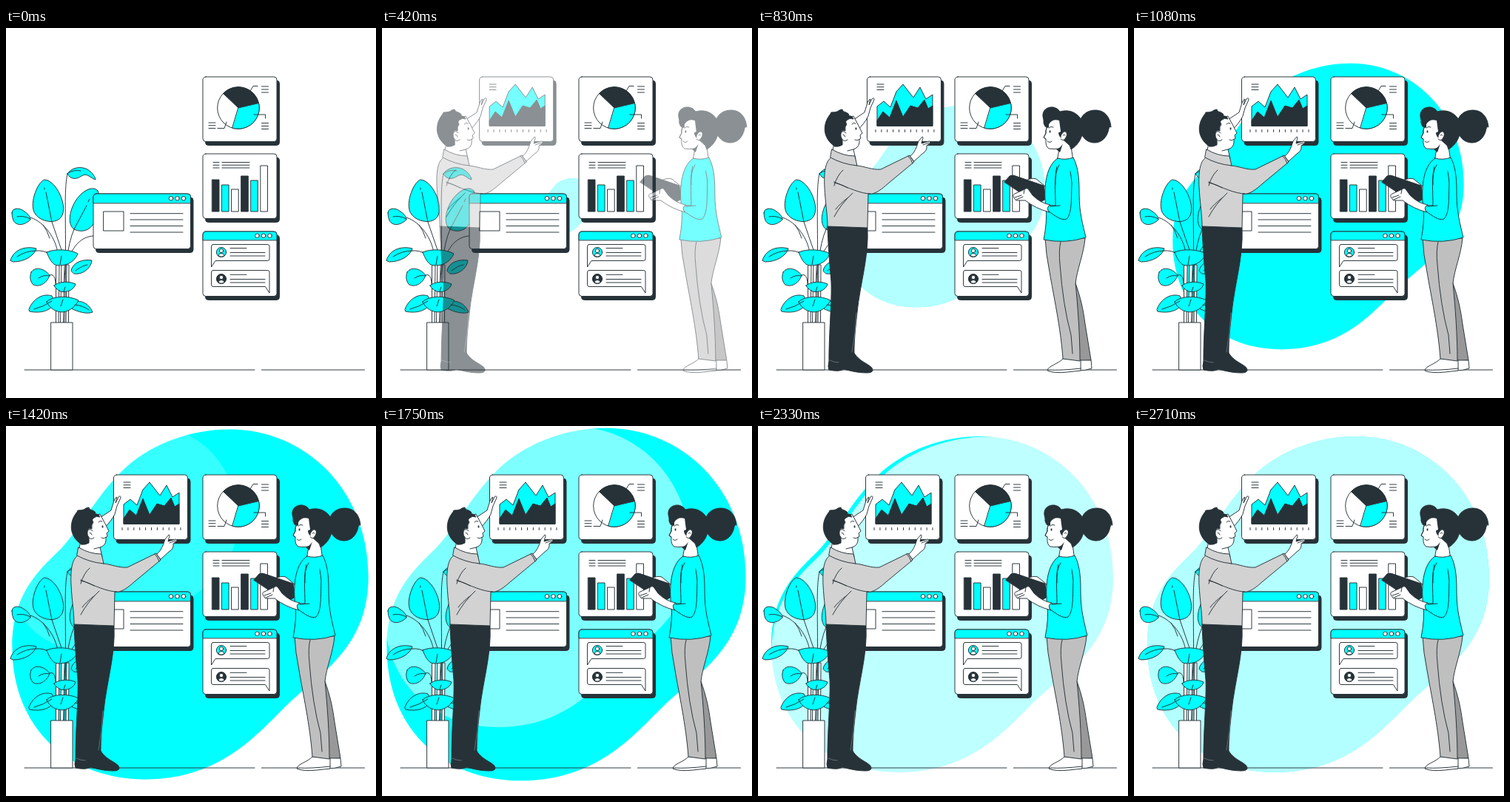
Write an HTML page that moves like this. It is 500 px wide and 500 px high and loops after 2750 ms.

```html
<!DOCTYPE html>
<html lang="en">
<head>
<meta charset="utf-8">
<title>Data presentation</title>
<style>
html, body { margin: 0; width: 100%; height: 100%; overflow: hidden; background: #fff; }
svg { display: block; width: 100vw; height: 100vh; }
.ln { fill: none; }
.w { fill: #fff; }
.c { fill: #0ff; }
.d { fill: #263238; }
.s { fill: #d2d2d2; }
.g { fill: #bfbfbf; }
.g2 { fill: #989898; }
.n { stroke: none; }
</style>
</head>
<body>
<svg viewBox="0 0 500 500" stroke="#263238" stroke-width=".95" stroke-linecap="round" stroke-linejoin="round">
  <defs>
    <path id="blob" d="M300 14C398 14 480 92 480 205C480 286 432 322 387 360C346 395 300 468 190 468C95 468 18 405 18 296C18 225 55 195 82 168C112 135 130 95 168 61C202 32 250 14 300 14Z"/>
  </defs>
  <g id="back" class="n">
    <use href="#blob" fill="#0ff"/>
    <use id="veil" href="#blob" fill="#fff"/>
  </g>

  <path class="ln" d="M25 462H336M345.500 462H484.500"/>

  <g id="plant">
    <path class="ln" d="M83 197C77 225 83 270 79 398M62 262L76 303M33 256C52 262 68 285 70 305M50 266Q56 274 59 284M92 272Q79 300 75 398M118 281C101 282 90 296 86 310M41 301C55 300 62 307 66 315M59 334C66 331 67 341 67 348"/>
    <path class="w" d="M67.500 398V322Q70 318 72 322L71 398M73.500 398L75 320H79L77.500 398M81 398L82 320H85L84.500 398"/>
    <path class="c" d="M50 206C42 210 30 240 40 252C48 263 73 267 77 250C81 234 66 205 52 205Z"/>
    <path class="c" d="M124 220C118 213 105 218 95 232C85 247 83 266 92 272C105 278 118 272 122 255C126 240 127 226 124 220Z"/>
    <path class="c" d="M83 197C88 189 100 186 110 191C117 195 121 202 121 205C114 203 110 195 102 200C95 205 87 205 83 197Z"/>
    <path class="c" d="M8 250C8 243 18 242 25 248C31 252 33 256 33 259C25 267 14 268 10 260Q8 256 8 250Z"/>
    <path class="c" d="M6 314C10 300 25 294 41 298C38 308 25 316 10 316Z"/>
    <path class="c" d="M88 328C90 316 105 312 116 314C115 325 103 334 92 332Z"/>
    <path class="c" d="M34 330C38 323 50 323 59 334C56 344 46 351 37 347C32 342 32 335 34 330Z"/>
    <path class="c" d="M31 380C36 366 50 358 62 362L66 370C62 383 45 386 32 383Z"/>
    <path class="c" d="M90 371C100 366 112 372 117 384C110 387 98 384 88 379Z"/>
    <path class="c" d="M55 303C65 298 88 299 97 305C92 318 78 323 66 320C60 316 57 308 55 303Z"/>
    <path class="c" d="M65 348C72 342 86 342 94 346C92 354 82 358 74 356Q67 353 65 348Z"/>
    <path class="c" d="M55 370C62 362 85 361 98 368C92 380 80 386 70 383C62 381 57 375 55 370Z"/>
    <path class="ln" d="M52 216V218M54 222L62 262M113 231L111 235M109 240L92 272M84 196Q92 191 101 193M15 255Q24 253 33 258M15 309Q27 301 41 301M94 328Q103 321 110 320M44 338Q51 333 59 335M38 380Q50 377 62 369M93 374Q104 375 112 381M73 320L75 308M78 356L80 350M74 376L77 367"/>
    <rect class="w" x="61" y="398" width="29" height="64"/>
  </g>

  <g id="cards"></g>

  <g id="man">
    <path class="d" d="M92 268L146 270C148 310 136 345 132 385C129 412 128 425 128 439C136 453 154 455 153 463Q152 466 145 466C132 466 122 463 114 461Q108 465 94 462Q92 458 94 450C94 410 98 370 97 343Q93 300 92 268Z"/>
    <path class="ln" stroke="#8b9498" stroke-width=".6" d="M131 385Q130 412 125 438M95 449Q101 452 107 452"/>
    <g id="chart"></g>
    <path class="w" d="M127 124L142 114L146 101Q148 96 150 96L148 104L152 96Q155 93 155 97L150 108L147 119C144 126 138 132 134 137Z"/>
    <path class="w" d="M101 154L99 166L113 174L130 177L127 164Q134 162 135 155L135 151L137 149L136 145L139 142L134 132L127 119L105 125Z"/>
    <path class="d" d="M102 160C92 154 86 142 89 130C91 121 96 117 97 114Q102 114 105 113Q109 110 112 110Q112 113 117 114Q122 116 121 119Q125 118 127 123Q122 121 119 124Q115 126 118 130Q115 133 116 139Q110 137 110 144Q113 151 112 158Q107 161 102 160Z"/>
    <path class="w" d="M117 142C112 136 108 143 111 149Q114 155 119 151"/>
    <path class="ln" d="M125 130Q127 127 130 129M129 151Q133 153 135 150M119 166L127 164M113 144Q115 144 116 147"/>
    <ellipse class="d n" cx="130.500" cy="136" rx="1" ry="1.800"/>
    <path class="s" d="M97 175C89 180 87 195 88 215C89 236 92 252 92 268L146 270L147 224C156 226 166 217 174 210L209 181L203 172L164 191C152 192 143 187 132 186Z"/>
    <path class="s" d="M98 164Q113 173 129 173L132 186Q112 184 96 175Z"/>
    <path class="ln" d="M101 208C120 216 137 224 150 224M101 209C109 211 114 213 119 216M126 223Q110 238 101 255M120 229Q108 238 103 245M113 192Q105 199 101 213M201 173Q205 177 207 183"/>
    <path class="w" d="M204 173C210 168 212 162 215 153L220 147Q222 147 220 152L219 156L229 153Q232 153 230 156L226 159Q227 166 220 170L209 180Z"/>
    <path class="ln" d="M221 158L229 155"/>
  </g>

  <g id="woman">
    <path class="g2" d="M431 345C438 365 441 378 444 400L452 449L435 450L426 365Z"/>
    <path class="w" d="M437 449L452 449L453 460Q445 463 434 463Z"/>
    <path class="w" d="M414 447C408 454 393 457 393 463Q402 467 420 465L438 463V449Z"/>
    <path class="ln" d="M394 462Q412 463 438 460"/>
    <path class="g" d="M390 284L444 284C442 306 433 326 431 345C434 375 437 415 437 450L414 447C411 405 401 360 396 330Q391 306 390 284Z"/>
    <path class="ln" d="M411 289Q408 300 410 320Q414 375 425 415L427 440"/>
    <path class="w" d="M364 206Q372 202 378 204L390 214L392 228L382 224L371 209Z"/>
    <path class="d" d="M335 208L342 200Q346 198 350 200L388 213L391 231L382 236Q366 231 360 225Z"/>
    <path class="d" d="M436 130C438 117 447 111 458 111C471 111 478 121 479 134Q477 132 476 136C474 148 466 155 457 155C445 155 437 146 436 130Z"/>
    <path class="w" d="M395 127Q390 138 391 142L388 148L391 150Q390 160 395 163Q402 164 409 163L406 180L428 181L425 160L427 135Z"/>
    <path class="d n" d="M405 164Q412 161 414 156L410 168Z"/>
    <path class="d" d="M388 124C384 113 391 106 401 107Q407 108 410 113C424 109 436 116 440 127C444 142 437 157 425 164Q424 158 419 155L412 149Q406 143 410 136Q408 130 408 125Q400 127 398 132Q394 136 390 133Q387 129 388 124Z"/>
    <path class="w n" d="M395 130Q400 122 409 125L411 140L395 148Z"/>
    <path class="w" d="M412 144C416 136 422 141 418 148Q415 154 411 150"/>
    <path class="ln" d="M395 128Q390 138 391 142L388 148L391 150M395 135Q398 132 401 134M393 153Q396 156 399 153M414 145Q416 143 417 145"/>
    <ellipse class="d n" cx="396.500" cy="140" rx="1" ry="1.800"/>
    <path class="c" d="M407 176Q417 179 428 175C436 190 436 210 436 225C436 249 441 266 445 283Q418 292 388 286Q393 260 391 242C388 222 389 187 407 176Z"/>
    <path class="w" d="M347 228Q346 225 349 224L362 218Q366 215 368 219L373 226Q384 237 397 239L396 249Q377 244 363 233L351 233Z"/>
    <path class="ln" d="M349 229L358 226M351 232L360 228M362 218L361 224"/>
    <path class="c" d="M406 187C402 201 404 223 404 240L395 240Q392 243 394 247C403 254 413 261 419 258C427 250 425 226 426 210Q425 193 420 182"/>
    <path class="c n" d="M407 178Q418 181 427 178L423 196L406 190Z"/>
    <path class="ln" d="M410 240L397 241M409 185Q403 194 404 212"/>
  </g>
</svg>
<script>
const $ = id => document.getElementById(id);
const rect = (cls, x, y, w, h, r = 0) =>
  `<rect class="${cls}" x="${x}" y="${y}" width="${w}" height="${h}" rx="${r}"/>`;
const dot = (cls, x, y, r) => `<circle class="${cls}" cx="${x}" cy="${y}" r="${r}"/>`;
const path = (cls, d) => `<path class="${cls}" d="${d}"/>`;
const rows = (x1, x2, ys) => path('ln', ys.map(y => `M${x1} ${y}H${x2}`).join(''));
const card = (x, y, w, h) => rect('d', x + 3.5, y + 5, w, h, 4) + rect('w', x, y, w, h, 4);
const bar = (x, y, w, h) =>
  path('c', `M${x} ${y + h}V${y + 4}Q${x} ${y} ${x + 4} ${y}H${x + w - 4}Q${x + w} ${y} ${x + w} ${y + 4}V${y + h}Z`) +
  [26.5, 18, 9.5].map(o => dot('w', x + w - o, y + h / 2, 2.8)).join('');

function face(x, y, bg) {
  return dot(bg, x, y, 6.6) + dot('w', x, y - 2, 2.7) +
    path('w', `M${x - 4} ${y + 5}Q${x - 4} ${y + 1.5} ${x} ${y + 1.5}T${x + 4} ${y + 5}Q${x} ${y + 7.5} ${x - 4} ${y + 5}Z`);
}

function pie() {
  return card(266, 66, 100, 87.5) + dot('w', 314, 108, 28.3) +
    path('d', 'M314 108L293.500 88.500A28.300 28.300 0 0 1 341.500 101.500Z') +
    path('c', 'M314 108L341.500 101.500A28.300 28.300 0 0 1 306 135.200Z') +
    path('ln', 'M330 85L334 78.500H340M335 117H350.500V122M286 135.500H295L298 127') +
    rows(345.5, 354.5, [79, 83, 87]) + rows(345.5, 354.5, [128.5, 132.5, 136.5]) +
    rows(274, 283, [128, 131.7, 135.5]);
}

function bars() {
  const tops = [205, 212, 218, 200, 206, 186];
  return card(266, 170, 100, 87.5) +
    rows(280, 288, [181.5, 185.3, 189]) + rows(292, 329, [181.5, 185.3, 189]) +
    tops.map((y, i) => rect('dcw'[i % 3], 278.7 + i * 13.1, y, 9.3, 248 - y)).join('');
}

function chat() {
  return card(266, 275, 100, 87.5) + bar(266, 275, 100, 11.5) +
    path('w', 'M280 292.500H353.500Q356 292.500 356 295V312Q356 314.500 353.500 314.500H283L277.500 323V295Q277.500 292.500 280 292.500Z') +
    path('w', 'M280 327.500H353.500Q356 327.500 356 330V358L350.500 349.500H280Q277.500 349.500 277.500 347V330Q277.500 327.500 280 327.500Z') +
    face(291, 303, 'c') + face(291, 339, 'd') +
    rows(303, 325, [297.5, 333.3]) + rows(303, 350, [303.5, 308, 339.5, 344]);
}

function page() {
  return card(118, 224, 131.5, 74.5) + bar(118, 224, 131.5, 12.5) +
    rect('w', 132, 248, 27, 26) + rows(168, 239, [250.7, 259, 267.5, 276]);
}

function area() {
  let ticks = '';
  for (let i = 0; i < 11; i++) ticks += `M${157 + i * 7.9} 137.500v3`;
  return card(145.5, 66, 100, 87.5) + rows(159, 168, [76, 79.7, 83.5]) +
    path('c', 'M159 132V106L168 99L177 107L185 86L194 76L208 94L217 80L225 96L234 90V132Z') +
    path('d', 'M159 132V125L167 113L176 121L185 98L194 120L204 105L214 108L223 97L228 109L234 105V132Z') +
    path('ln', ticks);
}

$('cards').innerHTML = page() + pie() + bars() + chat();
$('chart').innerHTML = area();

// Bezier ease (.36, -.01, .5, 1.38): overshoots, then settles at 1
function ease(x) {
  if (x <= 0) return 0;
  if (x >= 1) return 1;
  const at = (s, a, b) => 3 * (1 - s) * (1 - s) * s * a + 3 * (1 - s) * s * s * b + s * s * s;
  let lo = 0, hi = 1;
  for (let i = 0; i < 24; i++) {
    const m = (lo + hi) / 2;
    if (at(m, 0.36, 0.5) < x) lo = m; else hi = m;
  }
  return at(lo, -0.01, 1.38);
}

function slide(id, dx, p) {
  $(id).setAttribute('transform', `translate(${dx * (1 - p)} 0)`);
  $(id).setAttribute('opacity', Math.min(1, Math.max(0, p)));
}

const LOOP = 2750, CX = 249, CY = 241, VEIL_AT = 935;

function draw(t) {
  const enter = ease((t - 20) / 1000);
  slide('man', -30, enter);
  slide('woman', 30, enter);

  const grow = Math.max(0, ease((t - 15) / 1900));
  $('back').setAttribute('transform', `translate(${CX} ${CY}) scale(${grow}) translate(${-CX} ${-CY})`);

  // The veil rests at full size until its own zoom from the corner begins
  const p = t < VEIL_AT ? 1 : ease((t - VEIL_AT) / 1700);
  $('veil').setAttribute('transform', `scale(${0.5 + 0.5 * p})`);
  $('veil').setAttribute('opacity', Math.max(0, 0.7 * p));
}

const start = performance.now();
function tick() {
  draw((performance.now() - start) % LOOP);
  requestAnimationFrame(tick);
}
tick();
</script>
</body>
</html>
```
